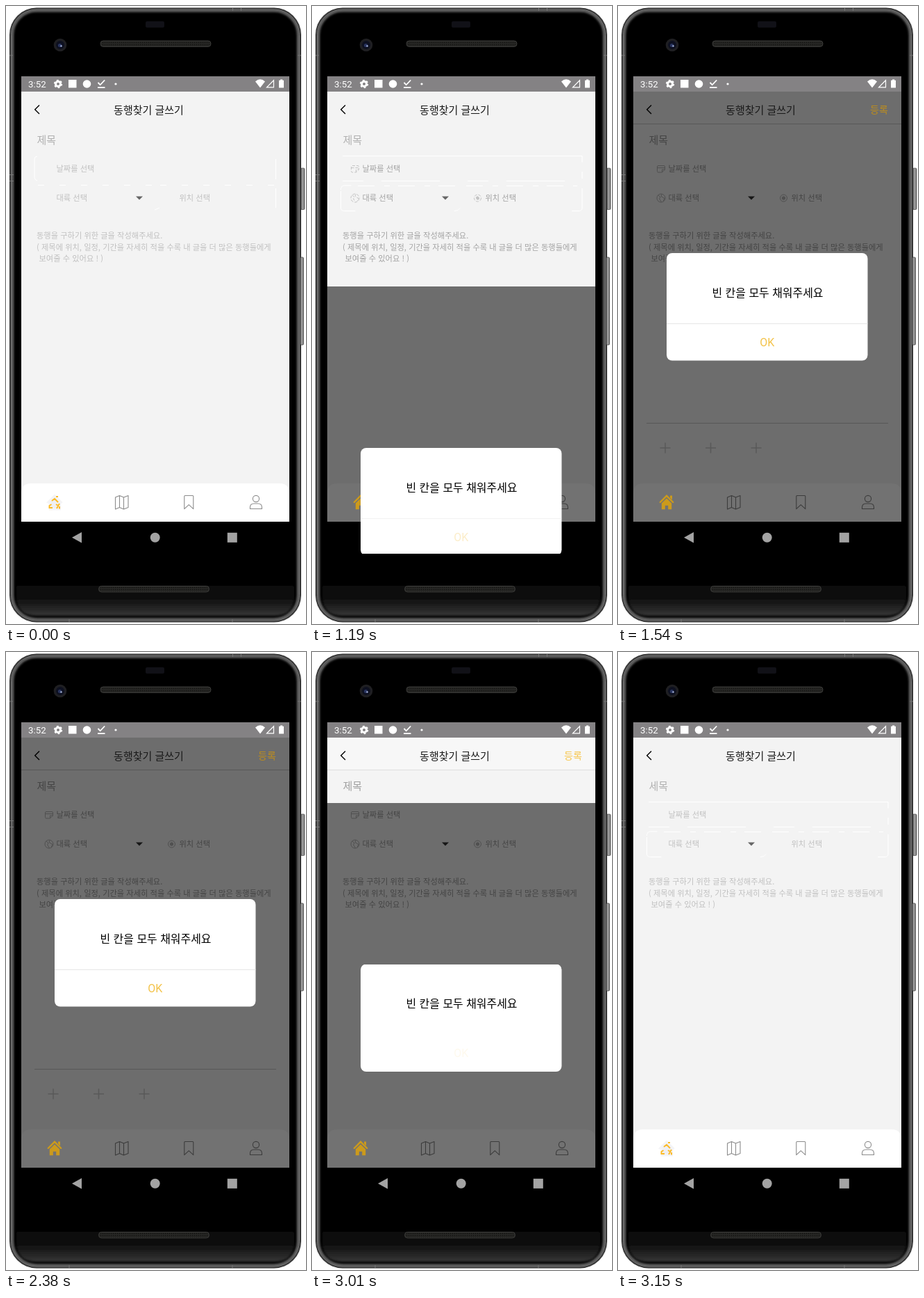
Animation of 432 by 888 pixels, one loop 3.29 s. Source, as an HTML page:

```html
<!DOCTYPE html>
<html lang="ko">
<head>
<meta charset="utf-8">
<title>글쓰기</title>
<style>
html, body { margin: 0; width: 100%; height: 100%; overflow: hidden; background: #fff; }
svg { position: absolute; left: 0; top: 0; width: 432px; height: 888px; overflow: hidden; }
text { font-family: "Noto Sans CJK KR", "Noto Sans KR", "Noto Sans CJK JP", "Noto Sans CJK", sans-serif; font-size: 11.25px; fill: currentColor; }
.big { font-size: 15px; }
.lat { font-family: Roboto, sans-serif; }
.line { fill: none; stroke: currentColor; stroke-width: 1.1; stroke-linejoin: round; }
.edge { fill: none; stroke: #fff; stroke-width: 1; }

.pale, .full, .jam, .sam, .edgeA, .edgeB, .bits, .house, .head, .dim, .settled, .card, .ok, .rule {
  animation: 3290ms step-end infinite;
}
.pale { animation-name: pale; color: #c0c0c0; }
.pale text { font-weight: 300; }
.full { animation-name: full; color: #a3a3a3; }
.jam { animation-name: jam; }
.sam { animation-name: sam; }
.edgeA { animation-name: edgeA; }
.edgeB { animation-name: edgeB; }
.bits { animation-name: bits; }
.house { animation-name: house; }
.head { animation-name: head; }
.dim { animation-name: dim; }
.settled { animation-name: settled; }
.card { animation-name: card; }
.ok { animation-name: ok; }
.rule { animation-name: rule; }

@keyframes pale { 0% { visibility: visible } 36.17% { visibility: hidden } 95.744% { visibility: visible } }
@keyframes full { 0% { visibility: hidden } 36.17% { visibility: visible } 95.744% { visibility: hidden } }
@keyframes jam { 0% { visibility: visible } 2.127% { visibility: hidden } 36.17% { visibility: visible } 95.744% { visibility: hidden } }
@keyframes sam { 0% { visibility: hidden } 2.127% { visibility: visible } 36.17% { visibility: hidden } 95.744% { visibility: visible } }
@keyframes edgeA { 0% { visibility: visible } 19.148% { visibility: hidden } }
@keyframes edgeB { 0% { visibility: hidden } 19.148% { visibility: visible } }
@keyframes bits { 0% { visibility: visible } 25.531% { visibility: hidden } 95.744% { visibility: visible } }
@keyframes house { 0% { visibility: hidden } 25.531% { visibility: visible } 95.744% { visibility: hidden } }
@keyframes head { 0% { visibility: hidden } 91.489% { visibility: visible } 95.744% { visibility: hidden } }
@keyframes settled { 0% { visibility: hidden } 40.425% { visibility: visible } 91.489% { visibility: hidden } }
@keyframes dim {
  0% { visibility: hidden; clip-path: inset(403px 0 0 0) }
  36.17% { visibility: visible; clip-path: inset(403px 0 0 0) }
  38.297% { visibility: visible; clip-path: inset(123px 0 0 0) }
  91.489% { visibility: visible; clip-path: inset(217px 0 0 0) }
  93.617% { visibility: visible; clip-path: inset(480px 0 0 0) }
  95.744%, 100% { visibility: hidden; clip-path: inset(480px 0 0 0) }
}
@keyframes card {
  0% { visibility: hidden; transform: translateY(432px) }
  36.17% { visibility: visible; transform: translateY(280px) }
  38.297% { visibility: visible; transform: translateY(60px) }
  40.425% { visibility: visible; transform: translateY(0) }
  91.489% { visibility: visible; transform: translateY(93.5px) }
  93.617% { visibility: visible; transform: translateY(340px) }
  95.744%, 100% { visibility: hidden; transform: translateY(432px) }
}
@keyframes ok { 0% { opacity: .3 } 40.425% { opacity: 1 } 80.851%, 100% { opacity: .1 } }
@keyframes rule { 0% { opacity: .5 } 40.425% { opacity: 1 } 80.851%, 100% { opacity: 0 } }
</style>
</head>
<body>

<svg viewBox="0 0 432 888">
  <defs>
    <linearGradient id="chin" x2="0" y2="1">
      <stop offset="0" stop-color="#000"/>
      <stop offset=".6" stop-color="#121212"/>
      <stop offset="1" stop-color="#363636"/>
    </linearGradient>
    <linearGradient id="key">
      <stop offset="0" stop-color="#555"/>
      <stop offset=".5" stop-color="#a8a8a8"/>
      <stop offset="1" stop-color="#666"/>
    </linearGradient>
    <pattern id="mesh" width="3" height="3" patternUnits="userSpaceOnUse">
      <rect width="3" height="3" fill="#262624"/>
      <circle cx="1.5" cy="1.5" r=".8" fill="#11110f"/>
    </pattern>
    <filter id="soft" x="-5%" y="-5%" width="110%" height="110%">
      <feGaussianBlur stdDeviation="1.6"/>
    </filter>

    <g id="bar">
      <path d="M48 142.5 41.7 148.8 48 155" fill="none" stroke="#000" stroke-width="1.4"/>
      <text class="big" x="205.5" y="154.5" text-anchor="middle" style="fill:#1a1a1a">동행찾기 글쓰기</text>
    </g>
    <g id="form">
      <text x="72.5" y="238">날짜를 선택</text>
      <text x="72.5" y="280">대륙 선택</text>
      <text x="249.5" y="280">위치 선택</text>
      <text x="44" y="334">동행을 구하기 위한 글을 작성해주세요.</text>
      <text x="44" y="351">( 제목에 위치, 일정, 기간을 자세히 적을 수록 내 글을 더 많은 동행들에게</text>
      <text x="47.5" y="367">보여줄 수 있어요 ! )</text>
    </g>
    <g id="marks" class="line" style="stroke-width:1">
      <path d="M58 229.5h8q1.5 0 1.5 1.5v4l-4 4H58q-1.5 0-1.5-1.5V231q0-1.5 1.5-1.5ZM56.5 232.5h11M63.5 239v-4h4"/>
      <circle cx="62" cy="276" r="6"/>
      <path d="M58 271.5l3 3.5-1.5 2 3 4.5M63 270.5l-1 3 5 3-2 4"/>
      <circle cx="238.5" cy="276" r="5"/>
      <circle cx="238.5" cy="276" r="2.2" fill="currentColor"/>
    </g>
    <path id="caret" d="M187 273.5h10l-5 5Z"/>
    <g id="tabs" class="line">
      <path d="M157.500 706l6-2.500 6 2.500 6.500-2.500v17l-6.500 2.500-6-2.500-6 2.500ZM163.500 703.500v17M169.500 706v17"/>
      <path d="M256.800 704.500q0-1 1-1h11q1 0 1 1v18.200l-6.500-6-6.500 6Z"/>
      <circle cx="360" cy="708" r="4.600"/>
      <path d="M351.500 722.500v-2q0-5.500 5.500-5.500h6q5.500 0 5.500 5.500v2Z"/>
    </g>
    <g id="home">
      <path d="M60.800 713 70 703.800l9.200 9.200" fill="none" stroke="currentColor" stroke-width="2.400" stroke-linecap="round"/>
      <path d="M75 703.500h3v6l-3-3ZM62.800 714.500l7.200-7 7.200 7v8.800h-5v-5.600h-4.400v5.600h-5Z" fill="currentColor"/>
    </g>
  </defs>

  <rect x="5" y="2.500" width="420" height="883" rx="39" fill="#2b2b2b"/>
  <rect x="6.500" y="4" width="417" height="880" rx="37.500" fill="#000"/>
  <rect x="9" y="6.500" width="412" height="875" rx="35" fill="none" stroke="#6c6c6c" stroke-width="4" filter="url(#soft)"/>
  <rect x="7.500" y="5" width="415" height="878" rx="36.500" fill="none" stroke="#777"/>
  <path d="M15 822h400v26q0 28-28 28H43q-28 0-28-28Z" fill="url(#chin)" filter="url(#soft)"/>
  <path d="M5 242.500h6M5 251.500h6M5 71h5M420 71h5M326.500 3v4M338.500 3v4M91 881v4M326 881v4" stroke="#777"/>
  <g fill="url(#key)" stroke="#333" stroke-width=".6">
    <rect x="424.500" y="233" width="5.500" height="59.500" rx="1.500"/>
    <rect x="423.500" y="361" width="5" height="126" rx="1.500"/>
  </g>

  <rect x="201" y="22" width="27" height="9" rx="2" fill="#111117"/>
  <circle cx="78" cy="56" r="9.300" fill="#1f1f22"/>
  <circle cx="78" cy="56" r="6" fill="#0d1020"/>
  <circle cx="77.500" cy="56.500" r="2.600" fill="#29345f"/>
  <circle cx="79.500" cy="57.500" r="1.200" fill="#a9b6dc"/>
  <g fill="url(#mesh)" stroke="#3a3a38">
    <rect x="136" y="50" width="159" height="8.500" rx="4"/>
    <rect x="133.500" y="833.500" width="159" height="8.500" rx="4"/>
  </g>

  <rect x="22" y="101" width="386" height="22" fill="#848284"/>
  <g fill="#fff" color="#fff">
    <text class="lat" x="32" y="116.800" style="font-size:13.300px">3:52</text>
    <circle cx="75" cy="112" r="3.500" fill="none" stroke="#fff" stroke-width="3"/>
    <circle cx="75" cy="112" r="5.300" fill="none" stroke="#fff" stroke-width="1.800" stroke-dasharray="2.775"/>
    <rect x="90" y="106" width="11.500" height="11.500"/>
    <circle cx="116.500" cy="112" r="5.800"/>
    <path d="M132.500 110l3.200 3.300 6.500-6.800M132 117.200h10.500" fill="none" stroke="#fff" stroke-width="1.800"/>
    <circle cx="158" cy="112" r="1.600"/>
    <path d="M359 108.500q7-6.500 14 0l-7 9Z"/>
    <path d="M385.500 106.800v10h-10Z" fill="none" stroke="#fff" stroke-width="1.200"/>
    <path d="M395 105.500h3.200v1.300h1.800v10.700h-7v-10.700h2Z"/>
  </g>
  <g fill="#a3a3a3">
    <path d="M95 763.700 109 756v15.500Z"/>
    <circle cx="214.700" cy="763.800" r="7"/>
    <rect x="318.800" y="756.800" width="14" height="14"/>
  </g>
</svg>

<svg viewBox="0 0 432 888">
  <rect x="22" y="123" width="386" height="618" fill="#f3f3f3"/>
  <use href="#bar"/>
  <g color="#b0b0b0">
    <text class="big jam" x="44.500" y="197.500">제목</text>
    <text class="big sam" x="44.500" y="197.500">세목</text>
  </g>
  <g class="edge edgeA">
    <path d="M45 216q-4 0-4 4v26q0 4 4 5M388.500 220v29M388.500 262v28M214 293l7-3"/>
    <path d="M46 257.500h166M222 257.500h164" stroke-dasharray="9 22"/>
  </g>
  <g class="edge edgeB">
    <path d="M44 215.500h345v9M389 238v10"/>
    <path d="M44 251.500h345" stroke-dasharray="30 26 84 40"/>
    <path d="M41.500 264q0-6 5-6h10M41.500 266v24q0 4.500 5 4.500h16M389 262v28q0 4.500-5 4.500h-10M205 294.500q6 0 8-4"/>
    <path d="M66 258.500h142M222 258.500h160" stroke-dasharray="24 14 8 12"/>
  </g>
  <use href="#form" class="pale"/>
  <g class="full">
    <use href="#form"/>
    <use href="#marks" color="#c4c4c4" stroke-dasharray="4 2"/>
  </g>
  <use href="#caret" fill="#666"/>

  <path d="M22 741v-41q0-14 14-14h358q14 0 14 14v41Z" fill="#fff"/>
  <use href="#tabs" color="#8c8c8c"/>
  <use href="#home" class="house" color="#fcc234"/>
  <g class="bits">
    <path d="M60.500 713 70 703.500l9.500 9.500-2 1.500v8.500h-14v-8.500Z" fill="#efeff3" stroke="#f4f4f7" stroke-width="3"/>
    <path d="M62.500 722v-4l3-2M66 711l4-3 5 5M72 705h3M63 721h4M72 716l4 2.500M77 715l-4 7M77 719v3.500" fill="none" stroke="#fcbb27" stroke-width="2"/>
  </g>

  <g class="head">
    <rect x="22" y="123" width="386" height="94" fill="#f4f4f4"/>
    <rect x="22" y="123" width="386" height="46" fill="#f7f7f7"/>
    <path d="M22 169.500h386" stroke="#dedede"/>
    <use href="#bar"/>
    <text x="363" y="154" style="font-size:14px" color="#f7c64b">등록</text>
    <text class="big" x="44.500" y="197.500" color="#a0a0a0">제목</text>
  </g>
</svg>

<svg class="dim" viewBox="0 0 432 888">
  <rect x="22" y="123" width="386" height="618" fill="#6d6d6d"/>
  <use href="#bar"/>
  <g color="#444">
    <text class="big" x="44.500" y="197.500">제목</text>
    <use href="#form"/>
    <use href="#marks" color="#505050"/>
  </g>
  <use href="#caret" fill="#161616"/>
  <path d="M22 741v-41q0-14 14-14h358q14 0 14 14v41Z" fill="#727272"/>
  <use href="#tabs" color="#3c3c3c"/>
  <use href="#home" color="#cc9a1c"/>
  <g class="settled">
    <path d="M22 169.500h386M41 599.500h348" stroke="#585858"/>
    <path d="M60.500 635h15M68 627.500v15M126 635h15M133.500 627.500v15M191.500 635h15M199 627.500v15" stroke="#595959" stroke-width="1.500"/>
    <text x="363" y="154" style="font-size:14px" color="#bd8d1d">등록</text>
  </g>
</svg>

<svg viewBox="0 0 432 888" style="clip-path:inset(0 0 101px 0)">
  <g class="card">
    <rect x="70" y="355" width="289.500" height="154.500" rx="8" fill="#fff"/>
    <text x="215.500" y="417.500" text-anchor="middle" style="font-size:15.940px;font-weight:500" color="#000">빈 칸을 모두 채워주세요</text>
    <path class="rule" d="M70 456.500h289.500" stroke="#e6e6e6"/>
    <text class="lat ok" x="214.700" y="488.500" text-anchor="middle" style="font-size:16px" color="#f3c34a">OK</text>
  </g>
</svg>

</body>
</html>
```
